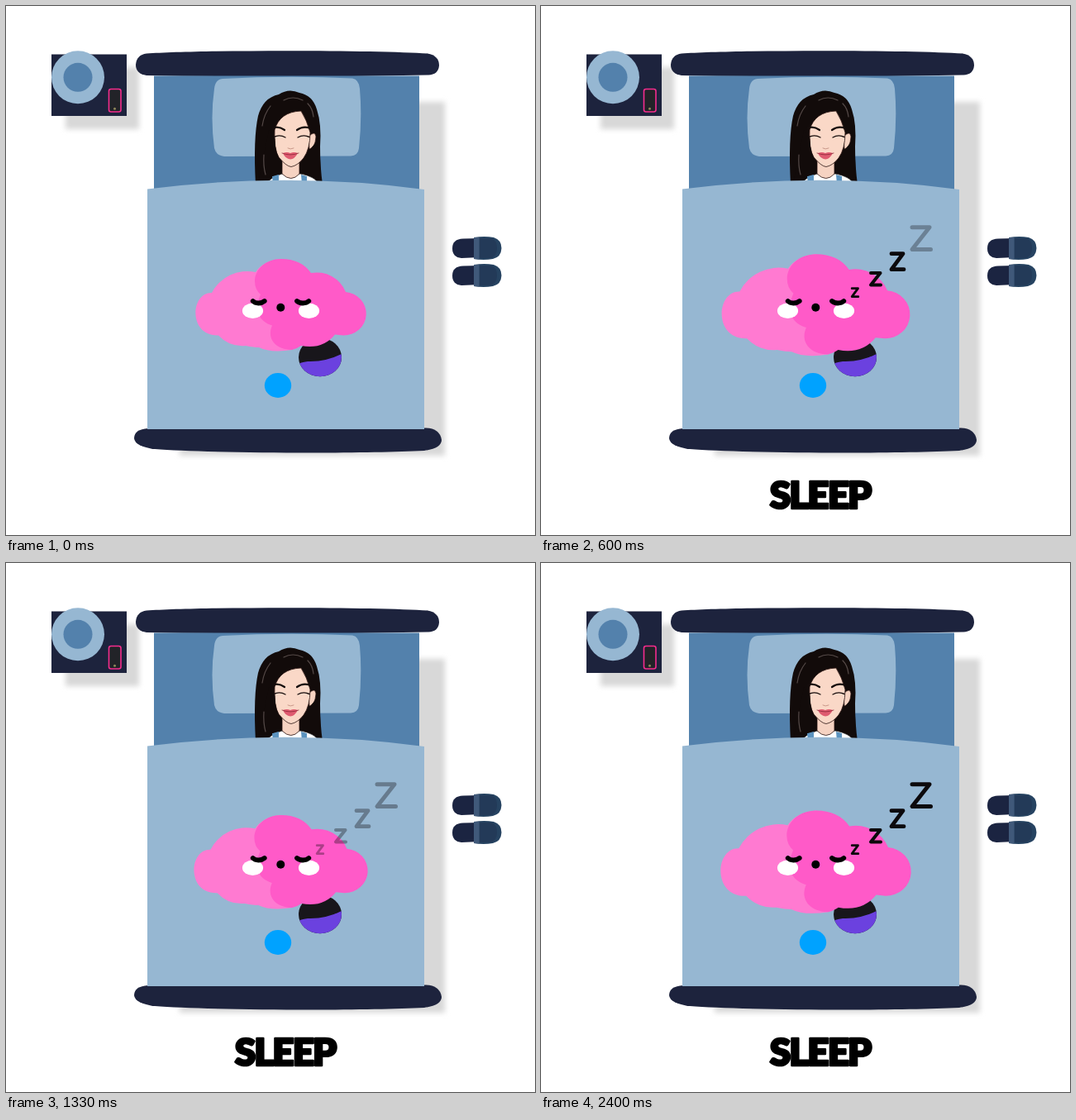
These frames come from a looping animation (640 by 640 pixels, 2430 ms). An HTML page:

```html
<!DOCTYPE html>
<html lang="en">
<head>
<meta charset="utf-8">
<title>Sleep</title>
<style>
  html, body { margin: 0; width: 100%; height: 100%; overflow: hidden; background: #fff; }
  svg { display: block; width: 100vw; height: 100vh; }
  .word { font: 900 46px Lato, sans-serif; letter-spacing: -2px; text-anchor: middle; stroke: #000; stroke-width: 2.6; stroke-linejoin: round; }
  .line { fill: none; stroke-linecap: round; stroke-linejoin: round; }
</style>
</head>
<body>
<svg viewBox="0 0 640 640">
  <defs>
    <filter id="soft"><feGaussianBlur stdDeviation="3"/></filter>
    <clipPath id="ball"><ellipse cx="380" cy="425" rx="26" ry="23.3"/></clipPath>
    <g id="slipper">
      <path fill="#1b2441" d="M553 281.5Q540 282 540 293Q540 304 551 305L574 304V281Z"/>
      <path fill="#264361" d="M566 280Q579 278 590 280Q599.5 283 599.5 293Q599 304 589 306Q578 308 566 306Z"/>
      <path fill="#233a58" d="M573 281H588Q594 284 594 293T587 305H573Z"/>
      <path fill="#40597a" d="M566 280H572.5V306.5L566 306Z"/>
    </g>
  </defs>

  <g fill="#d8d8d8" filter="url(#soft)">
    <rect x="72" y="74" width="89" height="75"/>
    <rect x="210" y="116" width="321" height="428"/>
  </g>

  <g id="nightstand">
    <rect x="55" y="58.5" width="91" height="74.5" fill="#1d233d"/>
    <circle cx="87" cy="86.3" r="32" fill="#96b7d2"/>
    <circle cx="87" cy="86.3" r="17.5" fill="#5381ac"/>
    <rect x="124.5" y="100.5" width="14.5" height="27.5" rx="2.5" fill="#222328" stroke="#f52c8d" stroke-width="1.6"/>
    <circle cx="131.5" cy="124.3" r="1.5" fill="#8c8558"/>
  </g>

  <g id="bed">
    <path fill="#1d233d" d="M170 57.5C230 53 450 53 510 57.5Q524 60 524 72Q523 83 511 83.5Q340 87 170 84Q157 82 157 71Q158 59 170 57.5Z"/>
    <path fill="#1d233d" d="M172 511Q155 512 155 523Q156 533 180 536C240 541 430 542 506 538Q527 535 527 525Q525 511 508 510.5Z"/>
    <rect x="179" y="84.5" width="321" height="140" fill="#5381ac"/>
    <path fill="#96b7d2" d="M262 88Q340 84 419 87.5Q427 89 428 100Q431 135 427 172Q426 181 417 181.5L264 182Q254 181 252 172Q247 135 252 100Q253 89 262 88Z"/>
  </g>

  <g id="sleeper">
    <path fill="#120b0a" d="M302 216Q299 160 305 133Q311 111 330 107Q342 99 355 105Q371 108 376 125Q382 143 380 170Q380 195 383 216Z"/>
    <path fill="#fff" stroke="#222" stroke-width=".7" d="M314 216Q320 207 334 203H356Q374 206 379 216Z"/>
    <path fill="#5b93bf" d="M322 206L330 204V216H323ZM357 204L364 206V216H358Z"/>
    <path fill="#f6d3c2" stroke="#2a1512" stroke-width=".8" d="M334 185V203Q345 214 355 203V185Z"/>
    <path fill="#f6d3c2" stroke="#2a1512" stroke-width=".7" d="M366 158Q374 150 375 158Q374 172 367 173Z"/>
    <path fill="#fad8c7" stroke="#2a1512" stroke-width=".8" d="M325 150Q324 173 330 183Q339 194 345 194.5Q353 193 360 184Q368 173 368 153Q364 138 357 127Q331 128 325 150Z"/>
    <path fill="#120b0a" d="M318 150L325.5 160Q325 178 334 190Q335 202 325 205L306 211Z"/>
    <path fill="#120b0a" d="M369 172Q365 182 356 190Q358 201 366 205L381 211L379 160Z"/>
    <path class="line" stroke="#544947" stroke-width="1.2" d="M310 145Q312 131 320 121M336 114Q347 108 359 114M365 118Q371 124 372 134M312 180Q311 193 314 204"/>
    <g class="line" stroke="#150d0c">
      <path stroke-width="2.2" d="M323 147.5Q330 145 337 150M352 150Q359 145 367 147.5"/>
      <path stroke-width="1.4" d="M324 158.5Q331 155 338 159M353 159Q360 155 367 158.5"/>
    </g>
    <path class="line" stroke="#c28f80" stroke-width=".9" d="M341 172Q344 174 348 172"/>
    <path fill="#df5b70" d="M335 178Q340 176 344 178Q348 176 353 178Q349 185.5 344 185.5Q338 185 335 178Z"/>
    <path class="line" stroke="#8c2738" stroke-width=".8" d="M334 178Q344 182 354 178"/>
  </g>

  <path fill="#96b7d2" d="M171 221.5Q338 200 506 222V512H171Z"/>
  <use href="#slipper"/>
  <use href="#slipper" y="33"/>

  <g clip-path="url(#ball)">
    <path fill="#18161b" d="M350 398H410V452H350Z"/>
    <path fill="#6b41df" d="M350 434Q357 431 365 430Q388 431 410 419V452H350Z"/>
  </g>
  <ellipse cx="329" cy="459" rx="16.2" ry="15" fill="#00a2ff"/>

  <g id="cloud">
    <path fill="#ff7ad1" d="M333 306Q311 308 302 322A48 48 0 0 0 249 347C223 346 220 400 257 398.5A40 40 0 0 0 290 411Q300 413 306 413Q320 420 346 416Z"/>
    <path fill="#ff5ac8" d="M333 306C314 306 301 319 301 333Q301 343 308 349C299 369 307 382 322 386.5C315 402 326 416 346 416Q353 414 357 411Q383 416 398 397.5L408 398.5A27 26.3 0 0 0 411 346A38 38 0 0 0 369 323Q357 306 333 306Z"/>
  </g>
  <g id="face">
    <ellipse cx="298.5" cy="368.7" rx="12.6" ry="9.2" fill="#fff"/>
    <ellipse cx="366.5" cy="368.7" rx="12.6" ry="9.2" fill="#fff"/>
    <path class="line" stroke="#000" stroke-width="5.8" d="M298.7 357Q301 359.3 305.5 359.5Q310 359.3 312.7 357M352 357Q354.500 359.3 359 359.5Q364 359.3 366.3 357"/>
    <circle cx="332.3" cy="364.8" r="5"/>
  </g>

  <g id="snore" class="line" stroke="#0c090c">
    <path stroke-width="2.8" d="M376.2 341.7H383.5L376.2 351.7H383.8"/>
    <path stroke-width="4" d="M399 323H410.5L399 337.5H411"/>
    <path stroke-width="4.8" d="M424 299.7H438L424 318.7H439"/>
    <path stroke-width="5" d="M449 267.8H470L449 294.5H471.5"/>
  </g>
  <g id="word"><text class="word" x="-1" y="17">SLEEP</text></g>
</svg>
<script>
  const LOOP = 2430, FADE = 100, STAGGER = 180, SNORES = [30, 1670], SNORE_END = 1265;
  const BREATHS = [0, 765, 1530, 2400];
  const cloud = document.getElementById('cloud');
  const word = document.getElementById('word');
  const zs = [...document.getElementById('snore').children];

  const ramp = (t, start, length) => Math.min(1, Math.max(0, (t - start) / length));
  const wave = u => (1 - Math.cos(Math.PI * u)) / 2;

  // Each half breath is a sine ease; odd ones breathe out.
  function breath(t) {
    const i = t < BREATHS[1] ? 0 : t < BREATHS[2] ? 1 : 2;
    const u = wave(ramp(t, BREATHS[i], BREATHS[i + 1] - BREATHS[i]));
    return 1 + 0.116 * (i % 2 ? 1 - u : u);
  }

  function zOpacity(t, i) {
    const [first, second] = SNORES.map(start => ramp(t, start + i * STAGGER, FADE));
    return t < SNORES[1] ? Math.min(first, 1 - ramp(t, SNORE_END, FADE)) : second;
  }

  const pop = t => 1.29 * wave(ramp(t, 170, 200)) - 0.29 * wave(ramp(t, 370, 200));

  function draw() {
    const t = performance.now() % LOOP;
    cloud.setAttribute('transform', `translate(332.7 362.2) scale(${breath(t)}) translate(-332.7 -362.2)`);
    zs.forEach((z, i) => z.setAttribute('opacity', zOpacity(t, i)));
    word.setAttribute('transform', `translate(338.5 590.7) scale(${pop(t)})`);
    requestAnimationFrame(draw);
  }
  draw();
</script>
</body>
</html>
```
